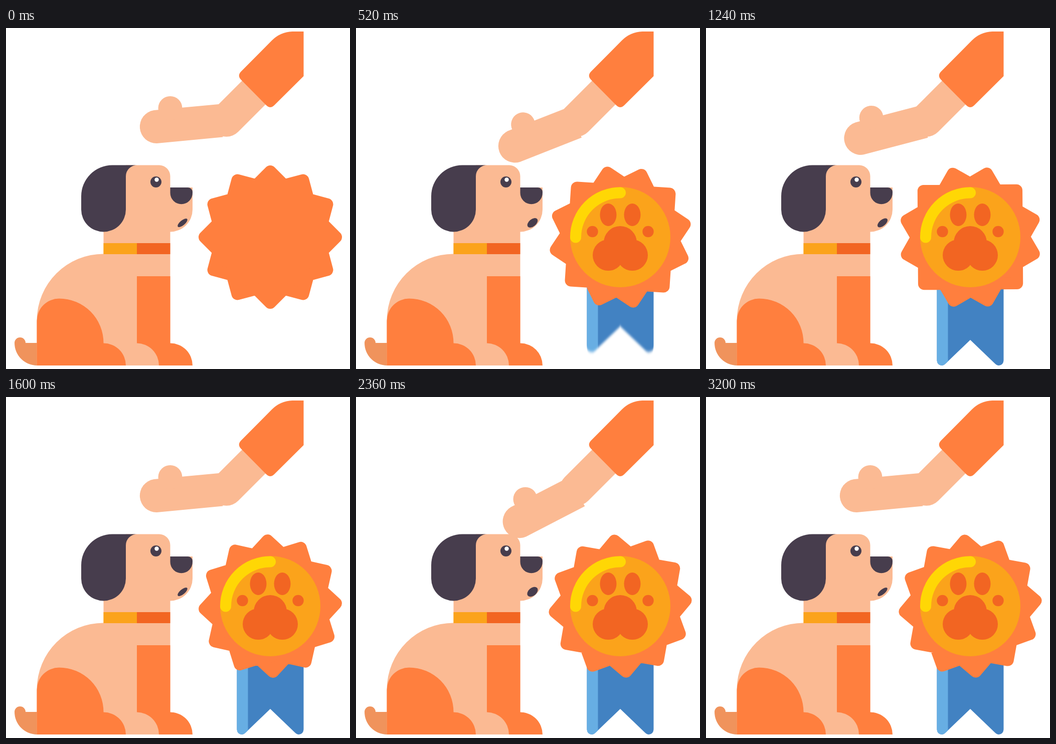
Write an HTML page that moves like this. It is 686 px wide and 680 px high and loops after 3.24 s.

```html
<!DOCTYPE html>
<html lang="en">
<head>
<meta charset="utf-8">
<title>Good dog</title>
<style>
  html, body { margin: 0; width: 100%; height: 100%; overflow: hidden; background: #fff; }
  svg { display: block; width: 686px; height: 680px; }
  .skin { fill: #fbba93; }
  .orange { fill: #ff7f3e; }
  .dark { fill: #473d4d; }
  .gold { fill: #fba31b; }
  .rust { fill: #f26522; }
</style>
</head>
<body>
<svg viewBox="0 0 686 680">
  <defs>
    <filter id="soft" x="-10%" y="-10%" width="120%" height="120%">
      <feGaussianBlur stdDeviation="0 3"/>
    </filter>
    <clipPath id="ribbonShape">
      <path d="M460.5 400V663Q461 672 470 673Q474 673 478 669L527 622L576 669Q580 673 584 673Q593 672 593.5 663V400Z"/>
    </clipPath>
  </defs>

  <!-- dog -->
  <path fill="#f0935c" d="M62 673A45 45 0 0 1 17 628A11 11 0 0 1 39 628H62Z"/>
  <path class="skin" d="M61.5 673V583A133 133 0 0 1 194.5 450.5V340H239V273.5H305.500A22 22 0 0 1 327.500 295.500V318H372V362A44.500 44.500 0 0 1 327.500 406.500V673Z"/>
  <path class="orange" d="M261 495H327.500V628.500A44.500 44.500 0 0 1 372 673H261Z"/>
  <path class="skin" d="M250 628.500H261A44.500 44.500 0 0 1 305 673H250Z"/>
  <path class="orange" d="M61.500 673V584A44.500 44.500 0 0 1 106 539.500A88.500 88.500 0 0 1 194.500 628.500A44.500 44.500 0 0 1 239 673Z"/>
  <path class="gold" d="M194.500 429H261V451H194.500Z"/>
  <path class="rust" d="M261 429H327.500V451H261Z"/>
  <path class="dark" d="M261 273.500H212A62 62 0 0 0 150 335.500V362A44.500 44.500 0 0 0 239 362V295.500A22 22 0 0 1 261 273.500Z"/>
  <path class="dark" d="M327.500 318H363A9 9 0 0 1 372 327V329A22.200 22.200 0 0 1 327.500 329Z"/>
  <circle class="dark" cx="299" cy="307" r="11"/>
  <circle fill="#fff" cx="300.500" cy="302.500" r="4.200"/>
  <ellipse id="mouth" class="dark" cx="352" cy="388.500" rx="12" transform="rotate(-40 352 388.500)"/>

  <!-- arm -->
  <g id="forearm" class="skin">
    <path d="M424 152L295 164A33.200 33.200 0 0 0 301 230L432.500 217.500Z"/>
    <circle cx="327.500" cy="160" r="24"/>
  </g>
  <path stroke="#fbba93" stroke-width="66.400" stroke-linecap="round" d="M439.500 183.500L500 123"/>
  <path class="orange" d="M593.500 7H571Q547 8 530 25L468.500 87Q461 95 468.500 103L519 154Q527 162 535 154L593.500 96Z"/>

  <!-- rosette -->
  <g id="ribbon">
    <g clip-path="url(#ribbonShape)">
      <path fill="#4282c2" d="M460 400H594V680H460Z"/>
      <path fill="#67aee3" d="M460 400H482.500V680H460Z"/>
    </g>
  </g>
  <path id="star" class="orange" stroke="#ff7f3e" stroke-width="24" stroke-linejoin="round"/>
  <g id="medal">
    <circle class="gold" r="100"/>
    <path fill="none" stroke="#ffd705" stroke-width="22" stroke-linecap="round" d="M-89 .5A89 89 0 0 1 0 -88.500"/>
    <g class="rust">
      <circle cy="11" r="33"/>
      <circle cx="-24" cy="36" r="31"/>
      <circle cx="24" cy="36" r="31"/>
      <ellipse cx="-24" cy="-44.500" rx="16.500" ry="22.500"/>
      <ellipse cx="24" cy="-44.500" rx="16.500" ry="22.500"/>
      <circle cx="-55.500" cy="-11" r="11.200"/>
      <circle cx="55.500" cy="-11" r="11.200"/>
    </g>
  </g>
</svg>
<script>
  const LOOP = 3240, STEP = 40, CENTER = "527 417";
  const el = id => document.getElementById(id);
  const set = (id, name, value) => el(id).setAttribute(name, value);

  const points = Array.from({ length: 24 }, (_, i) => {
    const r = i % 2 ? 107 : 131, a = i * Math.PI / 12;
    return `${r * Math.sin(a)} ${-r * Math.cos(a)}`;
  });
  set("star", "d", `M${points.join("L")}Z`);

  function draw(t) {
    const pat = (1 - Math.cos(t / 800 * Math.PI)) / 2;
    set("forearm", "transform", `rotate(${-22.1 * pat} 445 156)`);
    set("mouth", "ry", 4.8 + 3.2 * pat);

    set("star", "transform", `translate(${CENTER}) rotate(${t * 0.036})`);
    set("medal", "transform", `translate(${CENTER}) scale(${Math.min(1, t / 480)})`);

    const drop = Math.min(1, t / 610);
    set("ribbon", "transform", `translate(0 ${-183 * (1 - drop)})`);
    set("ribbon", "filter", drop < 1 ? "url(#soft)" : "none");
    set("ribbon", "visibility", t < 160 ? "hidden" : "visible");
  }

  const start = performance.now();
  function tick() {
    const t = (performance.now() - start) % LOOP;
    draw(Math.floor(t / STEP) * STEP);
    requestAnimationFrame(tick);
  }
  tick();
</script>
</body>
</html>
```
